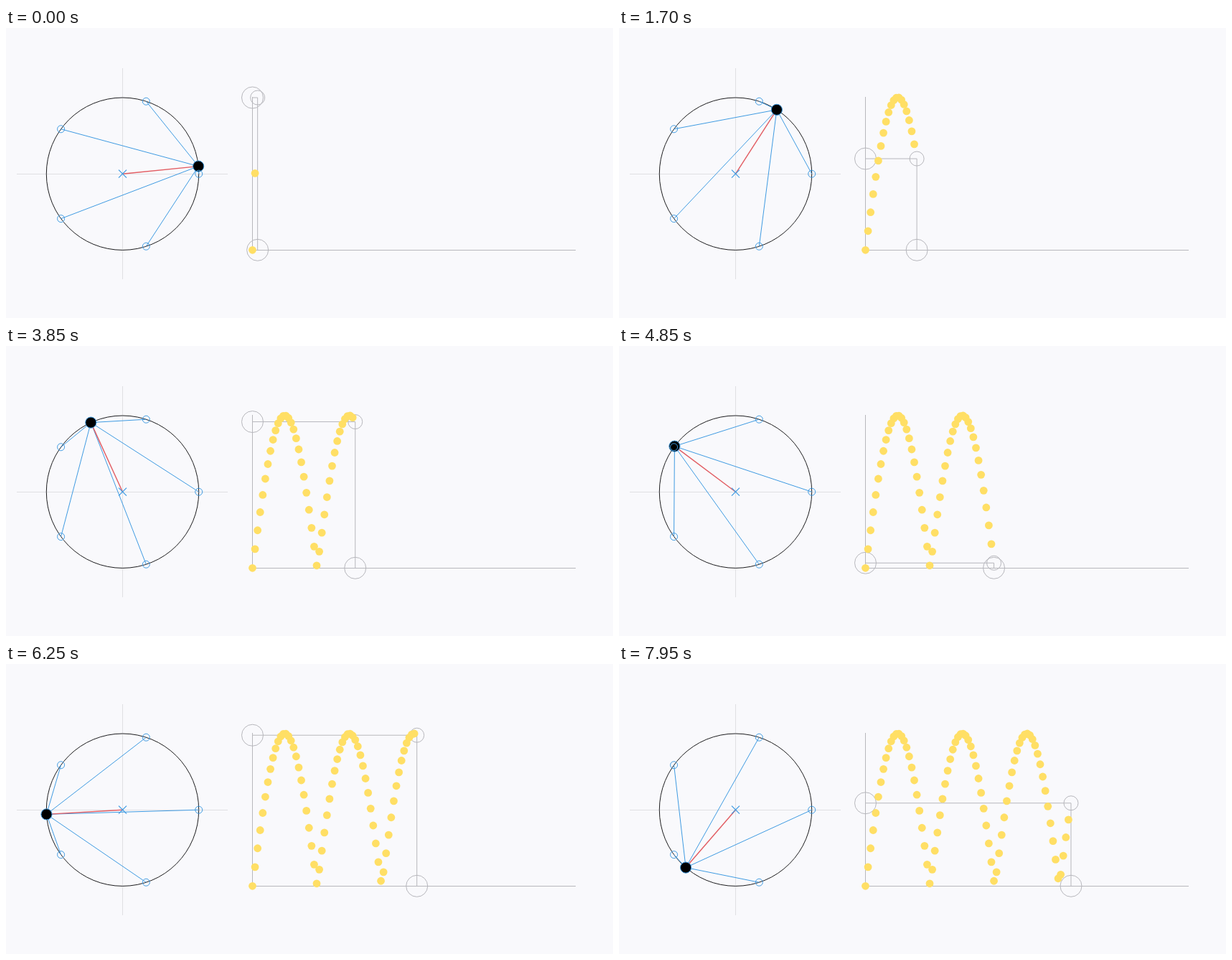
Animation, 846 px wide and 404 px high, one loop 8 s. Source, as an HTML page with a canvas:

```html
<!DOCTYPE html>
<html lang="en">
<head>
<meta charset="utf-8">
<title>Chord products on the unit circle</title>
<style>
  html, body { margin: 0; width: 100%; height: 100%; overflow: hidden; background: #f9f9fc; }
  canvas { display: block; width: 846px; height: 404px; }
</style>
</head>
<body>
<canvas id="stage" width="846" height="404"></canvas>
<script>
const ctx = document.getElementById('stage').getContext('2d');
const TAU = Math.PI * 2;
const LOOP = 8000;
const ROOTS = 5;
const STEP = 0.05;                 // radians per tick
const center = { x: 162.5, y: 203.2 };
const R = 106.2;
const plot = { x: 343.5, y: 309.3, w: 450, h: 212.3 };
const color = {
  paper: '#f9f9fc', grid: '#dfdfe3', ink: '#1c1c1e', blue: '#3f9be2',
  red: '#e25c62', gray: '#b7b7bc', yellow: '#ffdf65'
};

// Uneven ticking: 25 ticks per cycle, given as [ms, ticks] corners.
const CYCLE = 2550;
const TICKS = 25;
const pace = [[0, 0], [800, 8], [850, 9], [1650, 17], [1700, 18], [1800, 18], [2500, 25], [2550, 25]];

function tickAt(t) {
  const u = t % CYCLE;
  const i = pace.findIndex(([ms]) => ms > u);
  const [t0, n0] = pace[i - 1], [t1, n1] = pace[i];
  const ticks = n0 + (n1 - n0) * (u - t0) / (t1 - t0);
  return 2 + TICKS * Math.floor(t / CYCLE) + Math.floor(ticks + 1e-6);
}

const onCircle = a => ({ x: center.x + R * Math.cos(a), y: center.y - R * Math.sin(a) });
const roots = Array.from({ length: ROOTS }, (_, k) => onCircle(k * TAU / ROOTS));

// Product of the distances from the point to all roots of unity.
const product = n => 2 * Math.abs(Math.sin(ROOTS * n * STEP / 2));
const plotX = n => plot.x + plot.w * n * STEP / TAU;

function line(x1, y1, x2, y2, stroke, width = 1) {
  ctx.beginPath();
  ctx.moveTo(x1, y1);
  ctx.lineTo(x2, y2);
  ctx.strokeStyle = stroke;
  ctx.lineWidth = width;
  ctx.stroke();
}

function circle(x, y, r, stroke, fill) {
  ctx.beginPath();
  ctx.arc(x, y, r, 0, TAU);
  if (fill) { ctx.fillStyle = fill; ctx.fill(); }
  if (stroke) { ctx.strokeStyle = stroke; ctx.lineWidth = 1; ctx.stroke(); }
}

function drawCircle(n) {
  const p = onCircle(n * STEP);
  const { x, y } = center;
  line(15, 203.5, 309, 203.5, color.grid);
  line(162.5, 56, 162.5, 350, color.grid);
  circle(x, y, R, color.ink);
  roots.forEach(r => line(r.x, r.y, p.x, p.y, color.blue));
  line(x, y, p.x, p.y, color.red, 1.4);
  line(x - 5.5, y - 5.5, x + 5.5, y + 5.5, color.blue, 1.2);
  line(x - 5.5, y + 5.5, x + 5.5, y - 5.5, color.blue, 1.2);
  circle(p.x, p.y, 7.6, color.blue, '#000');
  roots.forEach(r => circle(r.x, r.y, 5, color.blue));
}

function drawPlot(n) {
  const values = Array.from({ length: n + 1 }, (_, k) => product(k));
  const scale = plot.h / Math.max(...values);
  const plotY = k => plot.y - values[k] * scale;
  const x = plotX(n), y = plotY(n);

  line(343.5, 96, 343.5, 309, color.gray);
  line(343, 309.5, 794, 309.5, color.gray);
  line(plot.x, y, x, y, color.gray);
  line(x, y, x, plot.y, color.gray);
  circle(plot.x, y, 15, color.gray);
  circle(x, plot.y, 15, color.gray);
  circle(x, y, 10, color.gray);
  for (let k = 0; k < n; k++) circle(plotX(k), plotY(k), 5.4, null, color.yellow);
}

const start = performance.now();
function frame() {
  const n = tickAt((performance.now() - start) % LOOP);
  ctx.fillStyle = color.paper;
  ctx.fillRect(0, 0, 846, 404);
  drawCircle(n);
  drawPlot(n);
  requestAnimationFrame(frame);
}
frame();
</script>
</body>
</html>
```
